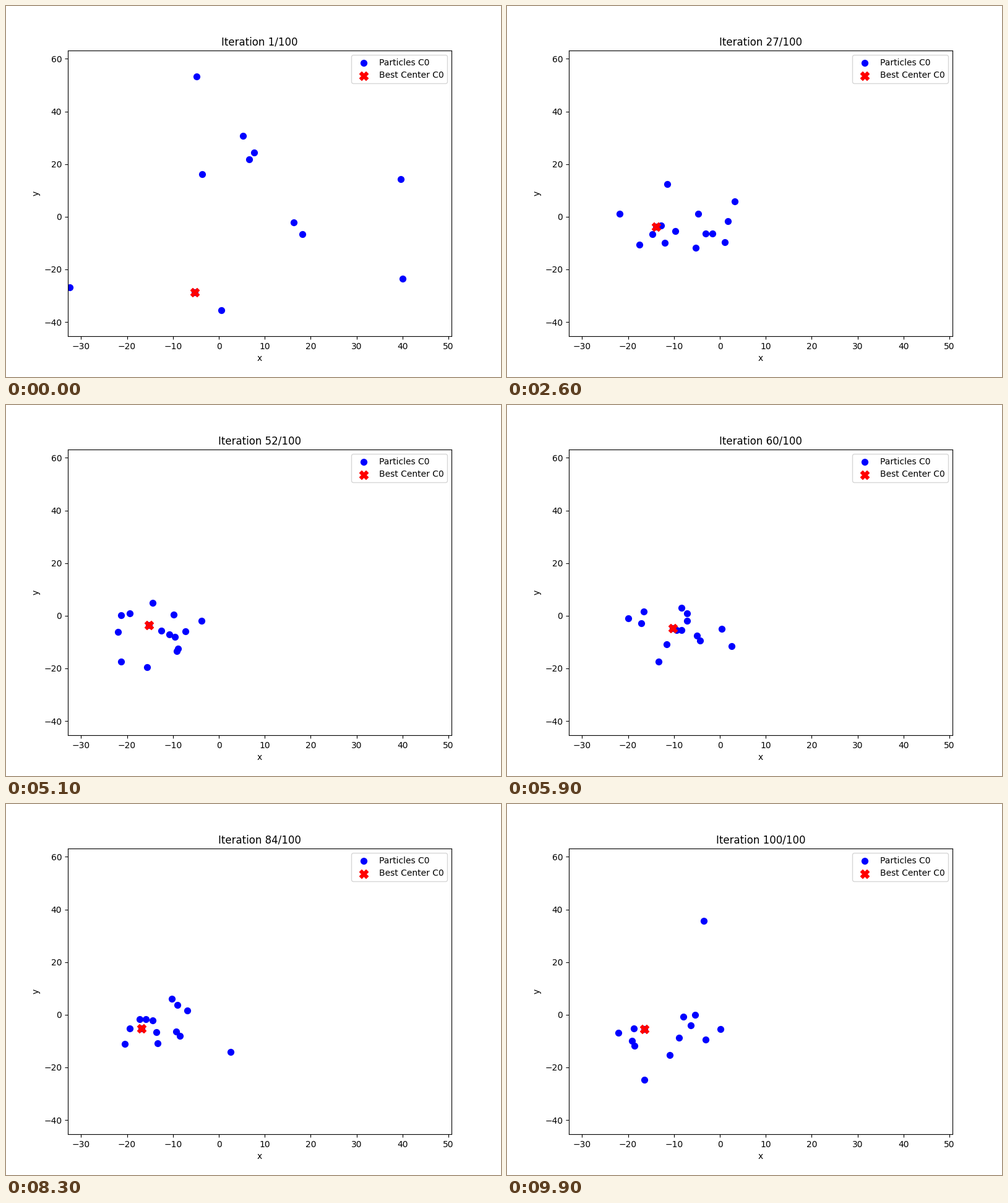
Recreate the animation shown at these times as a matplotlib script. Size 800x600 px, loop 10000 ms.

```python
import numpy as np
import matplotlib.pyplot as plt
from matplotlib.animation import FuncAnimation

STEPS = 100
EXTRA = 3           # particles that begin outside the view
INERTIA = 0.6
SPREAD = (4.5, 4.0)
DRIFT = (5.0, 0.0)  # the swarm trails to the right of the best center

START = [(-4.85, 53.29), (5.25, 30.73), (7.68, 24.39), (6.6, 21.8),
         (-3.64, 16.17), (39.62, 14.29), (16.3, -2.16), (18.19, -6.63),
         (40.02, -23.54), (-32.48, -26.83), (0.54, -35.53)]

# step: best center
CENTERS = {0: (-5.26, -28.71), 14: (-4.58, -10.38), 26: (-13.88, -3.81),
           51: (-15.23, -3.57), 67: (-8.22, -6.39), 83: (-16.85, -5.22),
           99: (-16.44, -5.45)}


def center_path(rng):
    """Path through the key centers, restless in between."""
    t = np.arange(STEPS)
    keys = list(CENTERS)
    x, y = zip(*CENTERS.values())
    path = np.column_stack([np.interp(t, keys, x), np.interp(t, keys, y)])
    phase = np.interp(t, keys, range(len(keys)))
    sway = np.abs(np.sin(np.pi * phase))
    return path + sway[:, None] * rng.normal(0, 1.5, path.shape)


def swarm_path(rng, center):
    """Particles fall in on the center with inertia and heavy-tailed kicks."""
    outside = np.column_stack([np.full(EXTRA, -45), rng.uniform(-30, 10, EXTRA)])
    pos = np.vstack([START, outside])
    path = [pos]
    for goal in center[1:] + DRIFT:
        kick = rng.standard_t(3, pos.shape) * SPREAD
        pos = goal + INERTIA * (pos - goal) + kick
        path.append(pos)
    return np.array(path)


rng = np.random.default_rng(7)
center = center_path(rng)
swarm = swarm_path(rng, center)

fig, ax = plt.subplots(figsize=(8, 6), dpi=100)
ax.set(xlim=(-32.882, 50.668), ylim=(-45.395, 63.155), xlabel="x", ylabel="y")
title = ax.set_title("")
dots = ax.scatter([], [], c="blue", s=50, label="Particles C0")
cross = ax.scatter([], [], c="red", s=100, marker="X", label="Best Center C0")
ax.legend(loc="upper right")


def update(step):
    best = center[step]
    # one particle always sits on the best center
    dots.set_offsets(np.vstack([swarm[step], best]))
    cross.set_offsets(best[None])
    title.set_text(f"Iteration {step + 1}/{STEPS}")
    return dots, cross, title


anim = FuncAnimation(fig, update, frames=STEPS, interval=100, repeat=True,
                     repeat_delay=0, blit=False)
plt.show()
```
